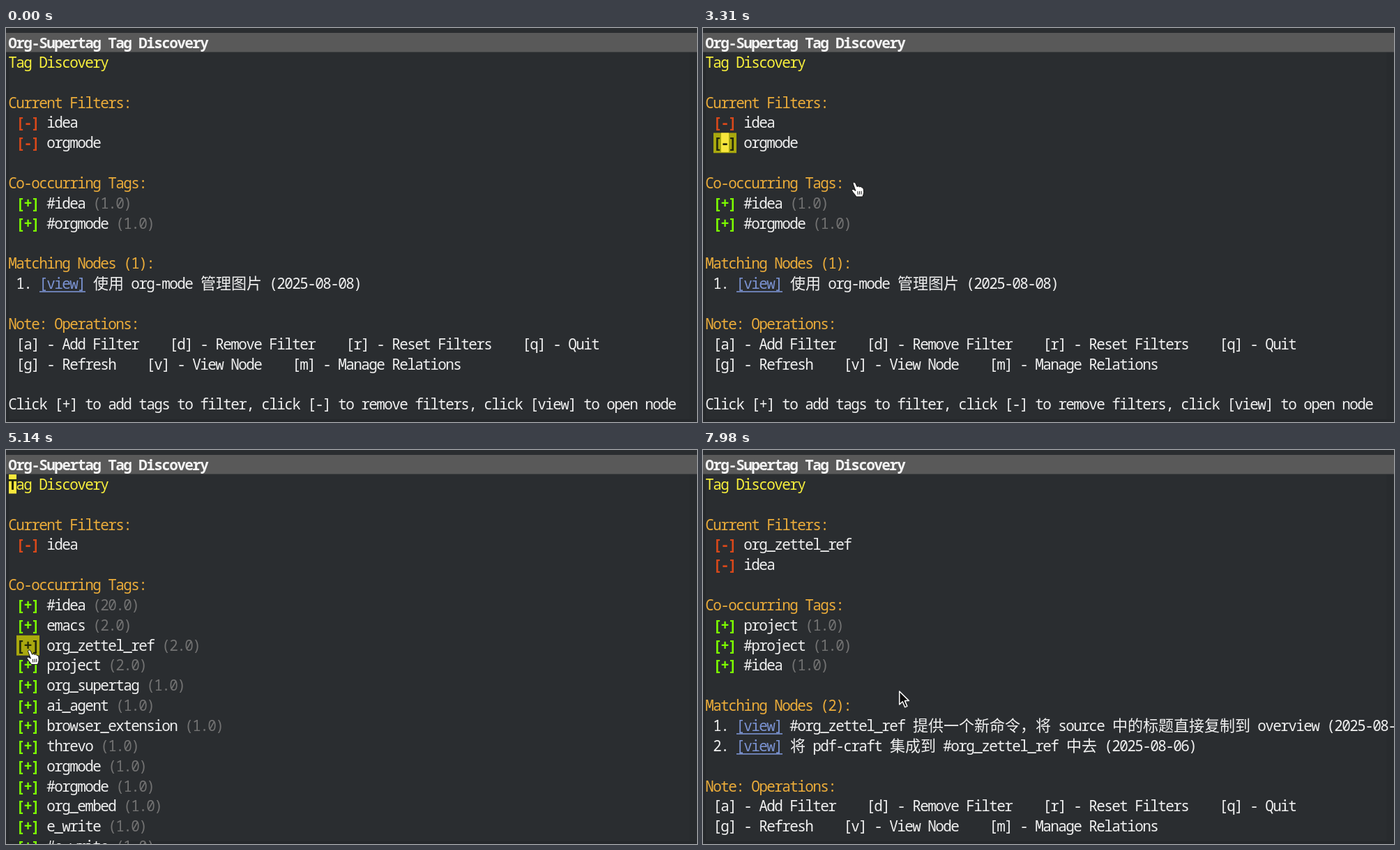
Animation of 991 by 565 pixels, one loop 8000 ms. Source, as an HTML page:

```html
<!DOCTYPE html>
<html lang="zh-CN">
<head>
<meta charset="utf-8">
<title>Tag Discovery</title>
<style>
  html, body { margin: 0; width: 100%; height: 100%; overflow: hidden; background: #2a2d30; }
  svg { display: block; width: 991px; height: 565px; }
  text { white-space: pre; font: 500 21px "Noto Sans Mono", "DejaVu Sans Mono", monospace; font-stretch: 87.5%; fill: #f0f0f0;
         font-variant-ligatures: none; }
  .cjk { font: 400 22px "Noto Sans CJK SC", "Noto Sans CJK", sans-serif; letter-spacing: 0; }
  .head { font-weight: 700; fill: #f4f4f4; }
  .title { fill: #f8f03c; }
  .section { fill: #ebac3a; }
  .minus { font-weight: 600; fill: #d8481a; }
  .plus { font-weight: 600; fill: #7cfc00; }
  .score { fill: #727272; }
  .link { fill: #7b93d2; }
  .dark { font-weight: 600; fill: #23280c; }
</style>
</head>
<body>
<svg id="stage" viewBox="0 0 991 565" xmlns="http://www.w3.org/2000/svg">
  <rect width="991" height="565" fill="#2a2d30"/>
  <rect y="34" width="4" height="531" fill="#25282b"/>
  <rect x="980" y="34" width="11" height="531" fill="#282b2e"/>
  <rect y="561" width="991" height="4" fill="#25282b"/>
  <rect y="7" width="991" height="27.5" fill="#595959"/>
  <g id="glimpse">
    <rect x="4" y="34.5" width="976" height="526" fill="#2c3031"/>
    <rect x="640" y="34.5" width="340" height="59" fill="#2b2e30"/>
    <g fill="none" stroke="#282c2d" stroke-width="1.5">
      <path d="M640 35V560"/>
      <rect x="703" y="146" width="104" height="42" rx="21"/>
      <rect x="853" y="42" width="24" height="23" rx="3"/>
      <circle cx="925" cy="53" r="14"/>
    </g>
    <text x="728" y="176" class="cjk" style="font-size:18px;fill:#272b2c">已加入</text>
  </g>
  <g id="screens"></g>
  <g id="marks"></g>
  <path id="arrow" d="M.7 1V20L5.2 15.8 8.6 23.8 11.8 22.4 8.4 14.6H14.4Z"
        fill="#0b0b0b" stroke="#fff" stroke-width="1.5" stroke-linejoin="round"/>
  <g id="hand" stroke="#111" stroke-linejoin="round" stroke-linecap="round">
    <path fill="#fff" d="M-3.4 2.2Q-2.6-.6 0 1.4L2.6 7.2Q4.4 5.4 6 7.4 8 6.2 9.2 8.4 11.4 8 11.8 10.6
             L12.2 15Q12 18 10.4 21.6H1.4Q-.6 18-3.4 15-6 12-4.4 11 -2.8 10.4.2 12.8Z"/>
    <path fill="none" d="M3.4 14.2l.4 4M6 14l.3 4M8.6 13.8l.2 4"/>
  </g>
</svg>
<script>
const LOOP = 8000, STEP = 60, CELL = 11, LEFT = 4, TOP = 35, PITCH = 28.85, BASELINE = 21.8;
const byId = id => document.getElementById(id);

function add(parent, name, attrs = {}, content = "") {
  const el = document.createElementNS("http://www.w3.org/2000/svg", name);
  for (const key in attrs) el.setAttribute(key, attrs[key]);
  el.textContent = content;
  parent.append(el);
  return el;
}
const colX = col => LEFT + col * CELL;
const rowY = row => TOP + row * PITCH;

// Fit the monospaced font to the terminal grid with one common spacing.
const probe = add(byId("screens"), "text", {}, "0".repeat(40));
const spacing = CELL - probe.getComputedTextLength() / 40;
probe.remove();

const WIDE = /([\u3000-\u9fff\uff00-\uffef]+)/;

function drawRuns(parent, runs, baseline, col = 0) {
  const line = add(parent, "text", { y: baseline, style: `letter-spacing:${spacing}px` });
  for (const [style, text] of runs) {
    for (const part of text.split(WIDE).filter(Boolean)) {
      const wide = WIDE.test(part), length = part.length * (wide ? 2 : 1);
      add(line, "tspan", { x: colX(col) + (wide ? 0 : spacing / 2), class: wide ? "cjk" : style }, part);
      if (style === "link")
        add(parent, "rect", { x: colX(col), y: baseline + 3.2, width: length * CELL, height: 1.6, fill: "#7b93d2" });
      col += length;
    }
  }
}

const plain = text => [["", text]];
const section = text => [["section", text]];
const blank = [];
const filter = name => [["", " "], ["minus", "[-]"], ["", " " + name]];
const tag = (name, score = "1.0") => [["", " "], ["plus", "[+]"], ["", ` ${name} `], ["score", `(${score})`]];
const node = (i, text) => [["", ` ${i}. `], ["link", "[view]"], ["", " " + text]];

const intro = [[["title", "Tag Discovery"]], blank, section("Current Filters:")];
const cooccurring = section("Co-occurring Tags:");
const operations = [
  blank,
  section("Note: Operations:"),
  plain(" [a] - Add Filter    [d] - Remove Filter    [r] - Reset Filters    [q] - Quit"),
  plain(" [g] - Refresh    [v] - View Node    [m] - Manage Relations"),
  blank,
  plain("Click [+] to add tags to filter, click [-] to remove filters, click [view] to open node"),
];

const screens = [
  { from: 0, rows: [
    ...intro, filter("idea"), filter("orgmode"), blank,
    cooccurring, tag("#idea"), tag("#orgmode"), blank,
    section("Matching Nodes (1):"),
    node(1, "使用 org-mode 管理图片 (2025-08-08)"),
    ...operations ] },
  { from: 3670, rows: [
    ...intro, filter("idea"), blank,
    cooccurring, tag("#idea", "20.0"),
    ...["emacs", "org_zettel_ref", "project"].map(name => tag(name, "2.0")),
    ...["org_supertag", "ai_agent", "browser_extension", "threvo", "orgmode",
        "#orgmode", "org_embed", "e_write", "#e_write"].map(name => tag(name)) ] },
  { from: 6120, rows: [
    ...intro, filter("org_zettel_ref"), filter("idea"), blank,
    cooccurring, tag("project"), tag("#project"), tag("#idea"), blank,
    section("Matching Nodes (2):"),
    node(1, "#org_zettel_ref 提供一个新命令，将 source 中的标题直接复制到 overview (2025-08-06)"),
    node(2, "将 pdf-craft 集成到 #org_zettel_ref 中去 (2025-08-06)"),
    ...operations ] },
];

drawRuns(byId("screens"), [["head", "Org-Supertag Tag Discovery"]], 28.6);
screens.forEach((screen, i) => {
  screen.to = screens[i + 1]?.from ?? LOOP;
  screen.el = add(byId("screens"), "g");
  screen.rows.forEach((runs, row) => drawRuns(screen.el, runs, rowY(row) + BASELINE));
});

function mark(from, to, row, col, text, color, height) {
  const el = add(byId("marks"), "g");
  add(el, "rect", { x: colX(col), y: rowY(row), width: text.length * CELL, height, fill: color });
  drawRuns(el, [["dark", text]], rowY(row) + BASELINE, col);
  return { from, to, el };
}
const hover = (from, to, row, text) => mark(from, to, row, 1, text, "#a9a80f", PITCH);
const caret = (from, to, row, col, text) => mark(from, to, row, col, text, "#f8e73c", 27.5);

const timed = [
  ...screens,
  { from: 1730, to: 2460, el: byId("glimpse") },
  hover(2640, 3670, 4, "[-]"),
  hover(5080, 6120, 8, "[+]"),
  caret(2640, 2940, 5, 0, " "),
  caret(3000, 3670, 4, 2, "-"),
  caret(3670, 4230, 0, 0, "T"),
  caret(4720, 5230, 0, 0, "T"),
  caret(5510, 6120, 8, 2, "+"),
  caret(6120, 6680, 0, 0, "T"),
  caret(7180, 7680, 0, 0, "T"),
];

// Pointer moves: start time, number of steps, start point, end point.
const AWAY = [0, 900];
const moves = [
  [0, 1, AWAY, AWAY],
  [560, 6, [185, 462], [263, 509]],
  [1170, 1, [263, 509], [284, 532]],
  [1230, 1, AWAY, AWAY],
  [1730, 9, [263, 545], [68, 183]],
  [2460, 5, [68, 183], [29, 170]],
  [3250, 5, [29, 170], [721, 354]],
  [4660, 9, [721, 354], [35, 286]],
  [5760, 4, [35, 286], [560, 600]],
  [6120, 1, AWAY, AWAY],
  [7860, 3, [476, 542], [281, 345]],
];
const handTimes = [[2640, 3730], [5080, 6120]];
const POWER = 2.7;
const ease = u => u < .5 ? (2 * u) ** POWER / 2 : 1 - (2 - 2 * u) ** POWER / 2;
const show = (el, on) => el.setAttribute("visibility", on ? "visible" : "hidden");

function render(t) {
  for (const { from, to, el } of timed) show(el, t >= from && t < to);

  const [start, steps, a, b] = moves.findLast(move => t >= move[0]);
  const u = ease(Math.min(steps, Math.floor((t - start) / STEP) + 1) / steps);
  const [x, y] = a.map((v, i) => v + (b[i] - v) * u);
  const isHand = handTimes.some(([from, to]) => t >= from && t < to);
  for (const id of ["arrow", "hand"]) {
    byId(id).setAttribute("transform", `translate(${x.toFixed(1)} ${y.toFixed(1)})`);
    show(byId(id), (id === "hand") === isHand);
  }
}

const began = performance.now();
function tick() {
  render((performance.now() - began) % LOOP);
  requestAnimationFrame(tick);
}
tick();
</script>
</body>
</html>
```
